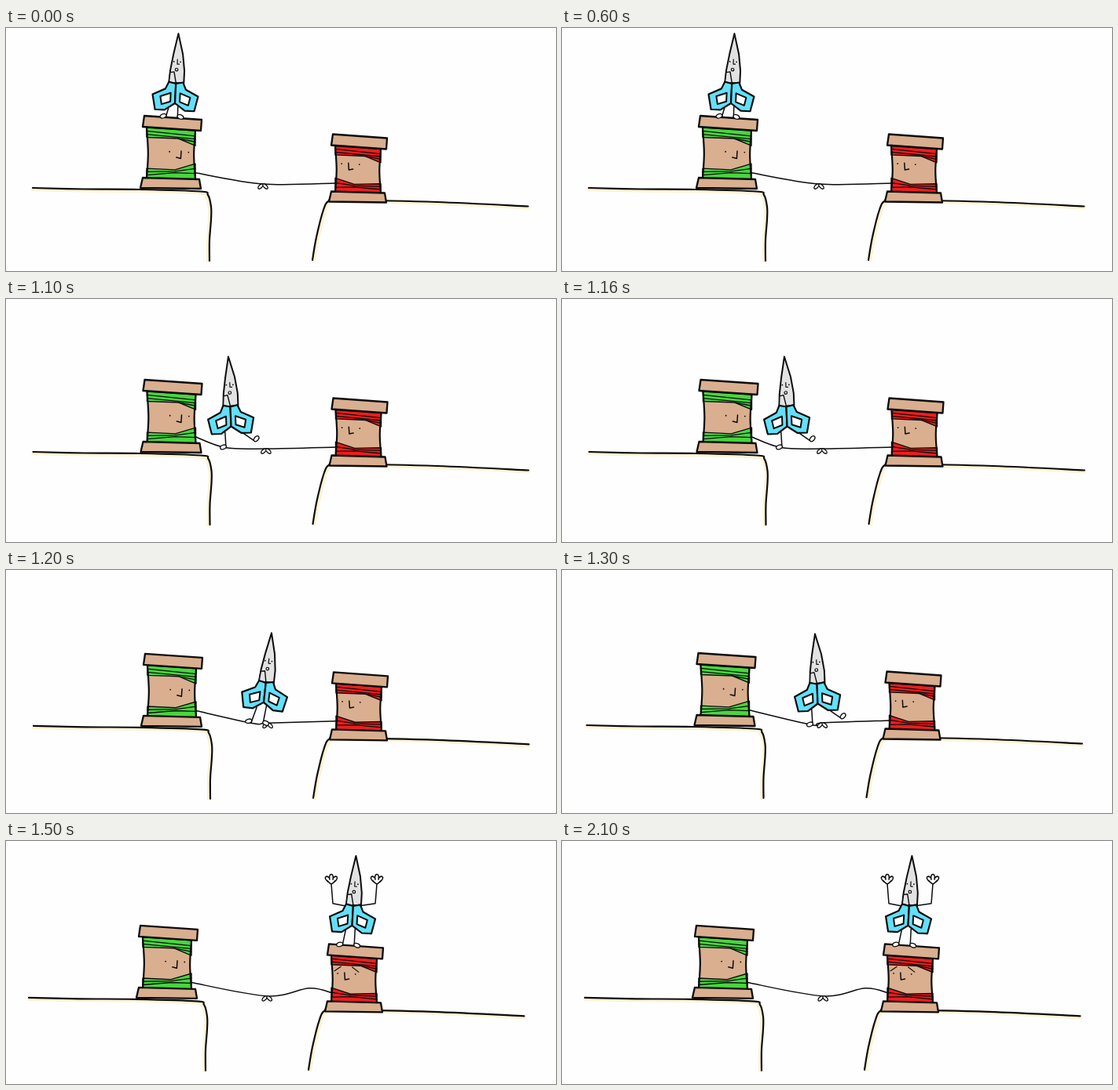
Animation of 700x310 px, one loop 2.5 s. Source, as an HTML page with a canvas:

```html
<!DOCTYPE html>
<html lang="en">
<head>
<meta charset="utf-8">
<title>Tightrope scissors</title>
<style>
  html, body { margin: 0; width: 100%; height: 100%; overflow: hidden; background: #fefefe; }
  canvas { display: block; }
</style>
</head>
<body>
<canvas id="stage" width="700" height="310"></canvas>
<script>
const ctx = document.getElementById('stage').getContext('2d');
const PAPER = '#fefefe', INK = '#0c0c0c', GLOW = '#fdf4d4', STEEL = '#e2e2e2';
const TAN = '#d9af90', GREEN = '#48d63f', RED = '#ee1d1d', BLUE = '#62e0fa';
const LOOP = 2500, HOLD = 1000, STEP = 100, LAST = 6;

// The sheet of paper lies a little differently in each pose.
const sheetX = [-1, -2.5, -.5, 0, -3.5, -4, -6];
const sheetY = [6, 3, -3, .8, 0, .3, 1.8];

function paint(fill, width) {
  if (fill) { ctx.fillStyle = fill; ctx.fill(); }
  if (width) { ctx.lineWidth = width; ctx.stroke(); }
}

function trace(p) {
  ctx.beginPath();
  for (let i = 0; i < p.length; i += 2) ctx.lineTo(p[i], p[i + 1]);
}

function line(width, ...p) { trace(p); paint(null, width); }

function shape(fill, width, ...p) { trace(p); ctx.closePath(); paint(fill, width); }

function oval(x, y, rx, ry, turn = 0, fill = PAPER, width = 1.3) {
  ctx.beginPath();
  ctx.ellipse(x, y, rx, ry, turn, 0, 7);
  paint(fill, width);
}

function dot(x, y) { oval(x, y, .9, .9, 0, INK, 0); }

// Smooth curve through all points.
function curve(width, ...p) {
  const count = p.length / 2;
  const at = i => { i = Math.max(0, Math.min(count - 1, i)); return [p[2 * i], p[2 * i + 1]]; };
  ctx.beginPath();
  ctx.moveTo(p[0], p[1]);
  for (let i = 0; i < count - 1; i++) {
    const [a, b, c, d] = [at(i - 1), at(i), at(i + 1), at(i + 2)];
    ctx.bezierCurveTo(b[0] + (c[0] - a[0]) / 6, b[1] + (c[1] - a[1]) / 6,
                      c[0] - (d[0] - b[0]) / 6, c[1] - (d[1] - b[1]) / 6, c[0], c[1]);
  }
  paint(null, width);
}

function cliff(glowX, ...points) {
  ctx.save();
  ctx.translate(glowX, 2);
  ctx.strokeStyle = GLOW;
  ctx.lineCap = 'butt';
  curve(4, ...points);
  ctx.restore();
  curve(2.2, ...points);
}

// (x, y) is the top left of the body; facing is the side the nose points to.
function spool(x, y, w, h, color, facing, faceY, worried) {
  const at = (...uv) => uv.map((n, i) => i % 2 ? y + n * h + 4 * uv[i - 1] * (1 - n) : x + n * w);
  const side = (...uv) => at(...uv.map((n, i) => i % 2 || facing < 0 ? n : 1 - n));

  shape(TAN, 0, ...at(0, 0, 1, 0, .97, .5, 1, 1, 0, 1, .03, .5));
  shape(color, 1.4, ...at(0, 0, 1, 0, 1, .31, .65, .18, 0, .19));
  shape(color, 1.4, ...side(0, .79, .58, .81, 1, .68, 1, 1, 0, 1));
  for (const k of [1, 2]) {
    line(1.3, ...at(0, .065 * k, 1, .05 + .06 * k));
    line(1.3, ...side(0, .79 + .065 * k, .58, .81 + .03 * k, 1, .68 + .1 * k));
  }
  line(1.3, ...at(.65, .18, 1, .23));
  for (const u of [0, 1]) curve(2.2, ...at(u, 0, .03 + .94 * u, .5, u, 1));
  shape(TAN, 2.3, x - 3, y - 15, x + w + 8, y - 10, x + w + 7, y + 4, x - 5, y - 1);
  shape(TAN, 2.3, x - 5, y + h - 2, x + w + 5, y + h, x + w + 7, y + h + 12, x - 8, y + h + 11);

  for (const u of [.47, .86]) {
    dot(...side(u, faceY));
    if (worried) line(1.2, ...side(u - .07, faceY - .1 * (u > .5) - .05, u + .07, faceY - .1 * (u < .5) - .05));
  }
  line(1.5, ...side(.71, faceY - .02, .7, faceY + .13, .61, faceY + .11));
}

// Where the handles meet, how far the body leans, and how the legs stand.
function walk(i) {
  if (i === 0) return { x: 216, y: 90, tilt: .05, leg: 18 };
  if (i === LAST) return { x: 446.5, y: 106, tilt: .055, leg: 26 };
  const pace = Math.floor((i - 1) / 2), lifted = i % 2 === 0;
  return {
    x: 286 + 42 * pace + lifted, y: 160.5 + 2.5 * i, leg: 27, lifted,
    tilt: lifted ? -.04 : .13 * Math.sin(.5 + 1.6 * pace)
  };
}

function thread(i, pose) {
  const knot = [328 + 1.7 * i, 193 + .5 * i];
  const points = [[241, 178.5], knot, [421, 192]];
  if (i === LAST) points.push([392, 186]);
  else if (i) points.push([pose.x - 9 - 35 * pose.tilt, pose.y + pose.leg]);
  curve(1.5, ...points.sort((a, b) => a[0] - b[0]).flat());
  for (const s of [-1, 1]) oval(knot[0] + 3 * s, knot[1] + 3, 4, 2, s * .75);
}

function leg(hipX, hipY, x, y, side, lifted) {
  line(1.5, hipX, hipY, x, y);
  oval(x + 3.5 * side, y - (lifted ? 2 : 1), 4, 2.6, lifted ? -.8 : .35 * side);
}

function arm(side) {
  const x = 2.5 + 29 * side;
  line(1.5, 9 * side, -25, x - 2 * side, -28, x, -53);
  for (const turn of [-1, 1, 0])
    oval(x + 4.2 * turn, turn ? -59 : -61, 2.3, 4.2, turn * .7, PAPER, 1.5);
  oval(x, -56, 3.6, 2.6, 0, PAPER, 0);
  curve(1.5, x - 5, -57, x, -53, x + 5, -57);
}

function scissors({ x, y, tilt, leg: length, lifted }, cheering) {
  ctx.save();
  ctx.translate(x, y);
  if (cheering) [-1, 1].forEach(arm);
  ctx.rotate(tilt);
  const lean = 35 * tilt;
  leg(-8, 7, -9 - lean, length, -1);
  if (lifted) leg(8, 4, 28, 19, 1, true);
  else leg(4, 4, 6 - lean, length, 1);

  shape(STEEL, 2, 0, -89, -5, -62, -8, -42, -9, -26, 10, -26, 10, -42, 7, -63);
  shape(STEEL, 1.4, -8, -39, -3, -40, 0, -26, -9, -26);
  for (const s of [-1, 1]) {
    shape(BLUE, 2.2, 0, -25, 9 * s, -27, 13 * s, -18, 29 * s, -10, 25 * s, 9, 13 * s, 9, 0, 0);
    shape(PAPER, 2, 6 * s, -13, 19 * s, -8, 17 * s, 2, 6 * s, -2);
  }
  dot(-4, -53);
  dot(4.5, -53);
  line(1.2, .5, -56, .5, -50, 3, -50);
  oval(0, -43, 1.8, 1.8, 0, null, 1.2);
  ctx.restore();
}

function drawPose(i) {
  const pose = walk(i);
  ctx.fillStyle = PAPER;
  ctx.fillRect(0, 0, 700, 310);
  ctx.strokeStyle = INK;
  ctx.lineJoin = ctx.lineCap = 'round';
  ctx.save();
  ctx.translate(sheetX[i], sheetY[i]);
  cliff(-2, 35, 198, 100, 199.5, 170, 200, 248, 202.5, 258, 207, 262, 222, 262, 238, 260, 265, 260, 291);
  cliff(2, 665.5, 221.5, 549, 216, 427, 213.5, 412, 214.5, 405, 226, 396, 261, 391, 290);
  spool(180, 121, 62, 66, GREEN, -1, .45);
  spool(420, 144.5, 58, 60, RED, 1, .37, i === LAST);
  thread(i, pose);
  scissors(pose, i === LAST);
  ctx.restore();
}

function tick() {
  const t = performance.now() % LOOP;
  drawPose(t < HOLD ? 0 : Math.min(LAST, 1 + Math.floor((t - HOLD) / STEP)));
  requestAnimationFrame(tick);
}
tick();
</script>
</body>
</html>
```
